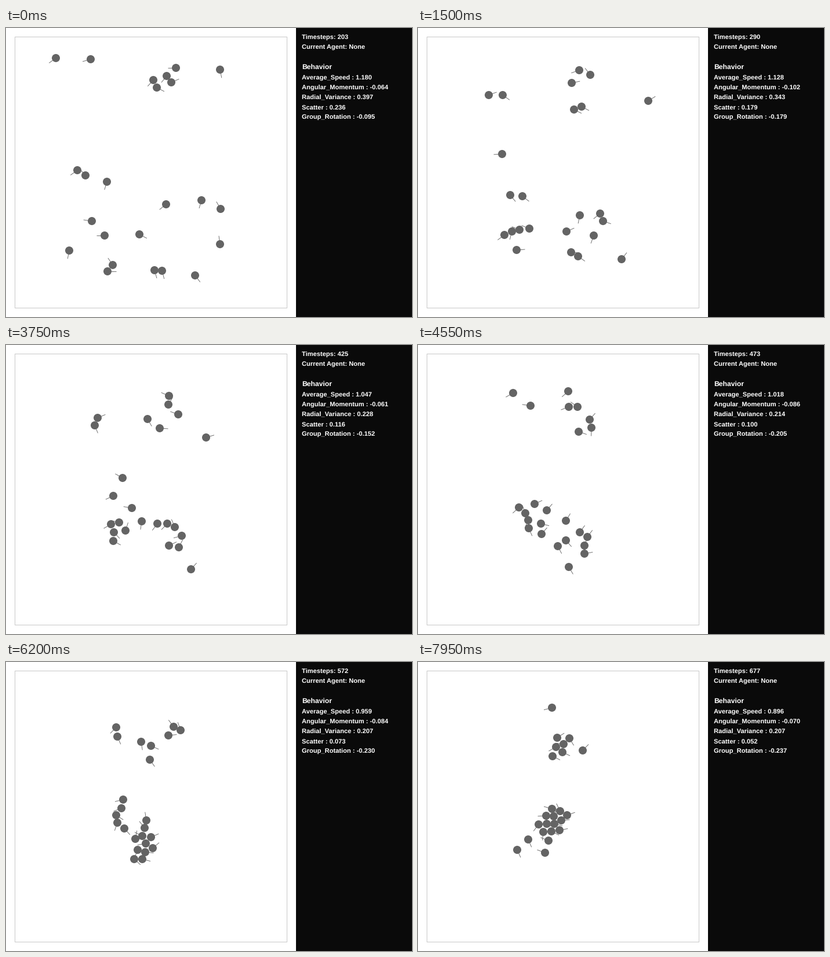
Animation, 700 px wide and 500 px high, one loop 8 s. Source, as a matplotlib script:

```python
import numpy as np
import matplotlib.pyplot as plt
from matplotlib.animation import FuncAnimation
from matplotlib.collections import EllipseCollection, LineCollection
from matplotlib.patches import Rectangle

W, H, DPI = 700, 500, 100
FRAMES, INTERVAL = 160, 50
STEPS_PER_FRAME, FIRST_STEP = 3, 203
RADIUS, WHISKER = 7, 14.5
GRAY = "#646464"

# Differential drive: (left, right) wheel speeds
CRUISE = (-0.45, -1.0)
SIGHTED = (1.0, -1.0)

plt.rcParams["text.hinting"] = "none"
plt.rcParams["font.family"] = "Liberation Sans"

# Initial state: x, y, heading in degrees (clockwise on screen)
START = np.array([
    (86, 52, 144), (146, 54, 164), (293, 69, 180), (277, 83, 129),
    (254, 90, 132), (285, 94, -23), (260, 103, 28), (369, 72, 79),
    (123, 246, 144), (137, 255, -132), (174, 266, 107), (276, 305, 141),
    (337, 298, 106), (370, 313, -120), (148, 334, 188), (170, 359, 180),
    (230, 357, 28), (109, 385, 101), (184, 410, -124), (175, 421, 0),
    (256, 419, 74), (269, 420, 75), (326, 428, 53), (369, 374, -98),
], float)


def unit(angle):
    return np.stack([np.cos(angle), np.sin(angle)], axis=-1)


def separate(pos):
    """Push overlapping agents apart."""
    for _ in range(2):
        diff = pos[:, None] - pos[None]
        dist = np.hypot(diff[..., 0], diff[..., 1])
        np.fill_diagonal(dist, np.inf)
        push = np.clip(2 * RADIUS - dist, 0, None) / 2 / np.maximum(dist, 0.1)
        pos = pos + (diff * push[..., None]).sum(axis=1)
    return pos


def advance(pos, head):
    """Back along a circle, or spin on the spot while another agent is in sight."""
    ahead = unit(head)
    diff = pos[None] - pos[:, None]
    along = (diff * ahead[:, None]).sum(axis=2)
    across = diff[..., 0] * ahead[:, None, 1] - diff[..., 1] * ahead[:, None, 0]
    sees = ((along > 0) & (np.abs(across) < RADIUS)).any(axis=1)
    left, right = np.where(sees[:, None], SIGHTED, CRUISE).T
    pos = pos + ahead * (left + right)[:, None]
    head = head + (left - right) / (2 * RADIUS)
    return separate(pos), head


def simulate():
    states = [(START[:, :2], np.radians(START[:, 2]))]
    for _ in range(FRAMES * STEPS_PER_FRAME):
        states.append(advance(*states[-1]))
    return states


def metrics(t):
    """Readings that settle as the swarm gathers."""
    swing = np.cos(2 * np.pi * (t - 87) / 231)
    return {
        "Average_Speed": 1.18 - 0.0006 * t,
        "Angular_Momentum": -0.08 - 0.022 * swing,
        "Radial_Variance": 0.207 + 0.19 * np.exp(-(t / 150) ** 2),
        "Scatter": 0.236 * np.exp(-t / 313),
        "Group_Rotation": -0.12 - 0.00028 * t - 0.035 * swing,
    }


STATES = simulate()

fig = plt.figure(figsize=(W / DPI, H / DPI), dpi=DPI, facecolor="white")
ax = fig.add_axes([0, 0, 1, 1])
ax.set_xlim(0, W)
ax.set_ylim(H, 0)
ax.axis("off")


def box(x, y, w, h, color):
    ax.add_patch(Rectangle((x, y), w, h, fc=color, lw=0))


box(15, 15, 470, 470, "#c8c8c8")
box(16, 16, 468, 468, "white")
box(500, 0, 200, 500, "#0a0a0a")

whiskers = LineCollection([], colors=GRAY, linewidths=0.65)
ax.add_collection(whiskers)
size = np.full(len(START), 2 * RADIUS)
discs = EllipseCollection(size, size, np.zeros(len(START)), units="xy",
                          offsets=START[:, :2], offset_transform=ax.transData,
                          facecolors=GRAY, linewidths=0)
ax.add_collection(discs)


def label(y, text="", px=11.1):
    return ax.text(510, y, text, color="white", weight="bold",
                   size=px * 72 / DPI, va="baseline")


clock = label(20)
label(37, "Current Agent: None")
label(71, "Behavior", 12.1)
rows = {name: label(90 + 17 * i) for i, name in enumerate(metrics(0))}


def draw(frame):
    step = max(0, frame - 1) * STEPS_PER_FRAME
    pos, head = STATES[step]
    pos = np.round(pos)
    discs.set_offsets(pos)
    whiskers.set_segments(np.stack([pos, pos + WHISKER * unit(head)], axis=1))
    clock.set_text(f"Timesteps: {FIRST_STEP + step}")
    for name, value in metrics(step).items():
        rows[name].set_text(f"{name} : {value:.3f}")
    return [discs, whiskers, clock, *rows.values()]


anim = FuncAnimation(fig, draw, frames=FRAMES, interval=INTERVAL,
                     repeat=True, repeat_delay=0, blit=False)
plt.show()
```
